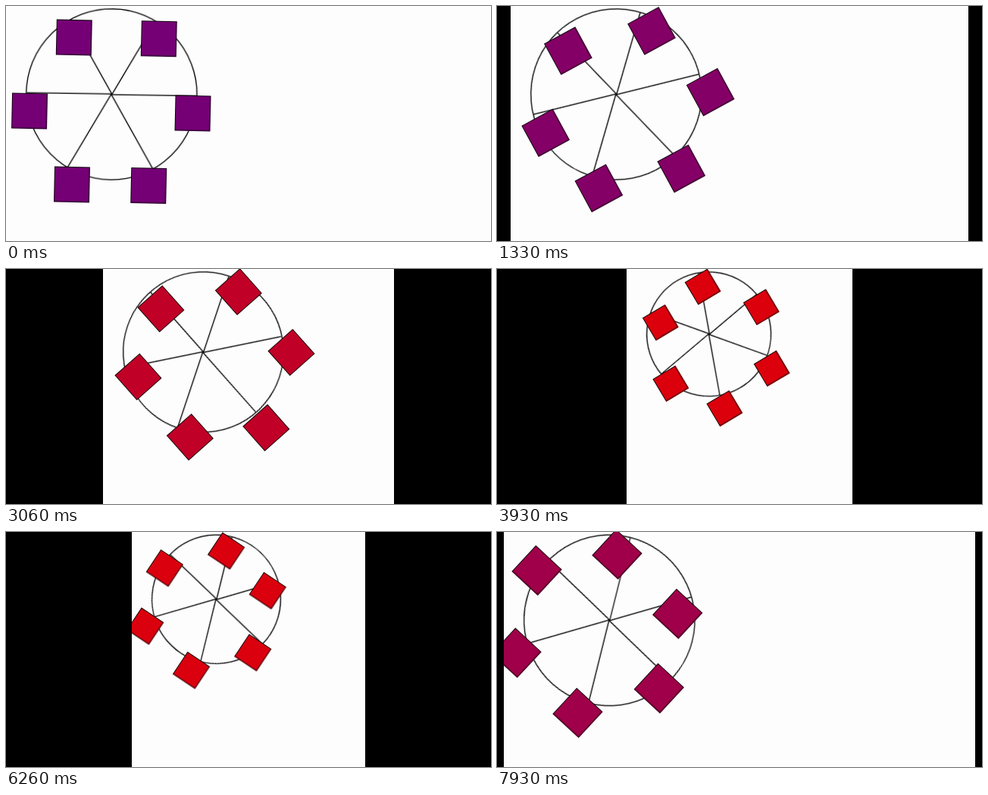
Animation of 640 by 310 pixels, one loop 8000 ms. Source, as an HTML page:

```html
<!DOCTYPE html>
<html lang="en">
<head>
<meta charset="utf-8">
<title>Ferris wheel in a resizing window</title>
<style>
  html, body { margin: 0; width: 100%; height: 100%; overflow: hidden; background: #000; }
  #pane { position: absolute; top: 0; height: 310px; overflow: hidden; background: #fdfdfd; }
  #page { position: absolute; transform: scale(.448); transform-origin: 0 0; }
  #wheel { position: absolute; left: 58px; top: 7px; border: 3px solid #000; border-radius: 50%; }
  .line { position: absolute; left: 50%; top: 50%; width: 50%; height: 3px; background: #000; transform-origin: 0 0; }
  .cabin { position: absolute; width: 20%; height: 20%; border: 2px solid #000; transform-origin: 50% 0; }
</style>
</head>
<body>
<div id="pane"><div id="page"><div id="wheel"></div></div></div>
<script>
const LOOP = 8000, TURN = 10000, SCALE = .448, CABIN_LAG = 30;
const RED = 'rgb(232, 0, 0)', PURPLE = 'rgb(117, 0, 117)';
const pane = document.getElementById('pane');
const wheel = document.getElementById('wheel');

// [time in ms, left edge of the window in px]
const EDGE = [
  [0, 0], [930, 0], [1330, 18], [1730, 47], [2200, 82], [2600, 103], [3460, 150],
  [3930, 171], [4330, 178], [5260, 204], [5560, 205], [6060, 184], [6930, 106],
  [7130, 101], [7800, 12], [7930, 9.5], [8000, 9]
];
// [time in ms, position within the wheel's turn in ms]
const PHASE = [[0, 5022], [1330, 6280], [8000, 12957]];

const CABINS = [
  { right: '-8.5%', top: '50%' },
  { right: '17%', top: '93.5%' },
  { right: '67%', top: '93.5%' },
  { left: '-8.5%', top: '50%' },
  { left: '17%', top: '7%' },
  { right: '17%', top: '7%' }
];

function track(points, t) {
  const i = Math.max(1, points.findIndex(point => point[0] >= t));
  const [t0, a] = points[i - 1], [t1, b] = points[i];
  return a + (b - a) * (t - t0) / (t1 - t0);
}

function add(className, style) {
  const part = document.createElement('div');
  part.className = className;
  Object.assign(part.style, style);
  wheel.append(part);
  return part;
}

function pausedTurn(element, keyframes) {
  const animation = element.animate(keyframes, { duration: TURN, iterations: Infinity });
  animation.pause();
  return animation;
}

for (let i = 0; i < 6; i++) add('line', { transform: `rotate(${i * 60}deg) translateY(-.5px)` });

const wheelTurn = pausedTurn(wheel, { transform: ['rotate(0deg)', 'rotate(360deg)'] });
const cabinTurns = CABINS.map(place => pausedTurn(add('cabin', place), [
  { offset: 0, transform: 'rotate(0deg)', backgroundColor: RED, easing: 'ease-in-out' },
  { offset: .5, backgroundColor: PURPLE, easing: 'ease-in-out' },
  { offset: 1, transform: 'rotate(-360deg)', backgroundColor: RED }
]));

function draw(t) {
  const left = Math.round(track(EDGE, t));
  const width = 640 - 2 * left;
  pane.style.left = left + 'px';
  pane.style.width = width + 'px';

  const diameter = Math.min(500, .55 * (width - 2) / SCALE);
  wheel.style.width = wheel.style.height = diameter + 'px';

  const phase = track(PHASE, t);
  wheelTurn.currentTime = phase;
  for (const turn of cabinTurns) turn.currentTime = phase - CABIN_LAG;
}

const start = performance.now();
function tick() {
  draw((performance.now() - start) % LOOP);
  requestAnimationFrame(tick);
}
tick();
</script>
</body>
</html>
```
